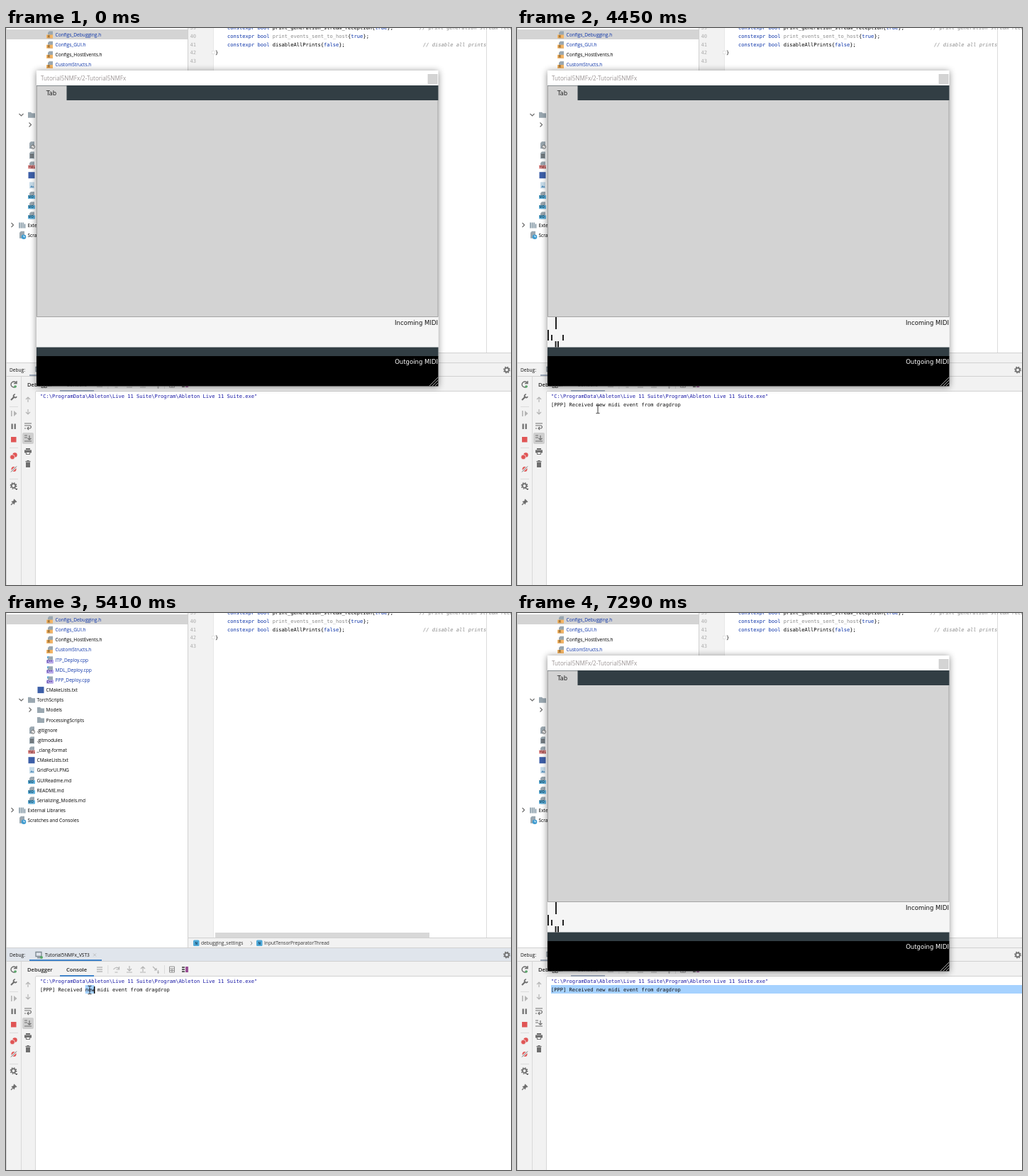
These frames come from a looping animation (712 px wide and 786 px high, 8000 ms). An HTML page:

```html
<!DOCTYPE html>
<html lang="en">
<head>
<meta charset="utf-8">
<style>
html, body { margin: 0; width: 100%; height: 100%; overflow: hidden; background: #fff; }
svg { display: block; width: 712px; height: 786px; --head: #f2f2f2; --line: #9ca7b8; }
svg.focus { --head: #e0e5ec; --line: #4083c9; }
text { white-space: pre; font-family: "Open Sans", "Noto Sans", sans-serif; font-size: 6.6px; font-weight: 500; }
.code { font-family: "DejaVu Sans Mono", "Noto Sans Mono", monospace; font-size: 7.07px; }
.gui { font-family: "DejaVu Sans", sans-serif; font-size: 8.53px; font-weight: 400; }
.title { font-size: 8.1px; font-weight: 400; }
.tab { font-size: 7.6px; font-weight: 600; }
.tag { font-size: 4.4px; font-weight: 700; }
.shadow { filter: drop-shadow(0 1px 5px #0007); }
</style>
</head>
<body>
<svg id="stage" viewBox="0 0 712 786"></svg>
<script>
const stage = document.getElementById('stage');
const GREY = '#6e6e6e', PALE = '#b4b4b4', RED = '#e05555', BLUE = '#0a32a8', PANEL = '#f2f2f2', EDGE = '#d1d1d1';

const rect = (x, y, w, h, fill, more = '') =>
  `<rect x="${x}" y="${y}" width="${w}" height="${h}" fill="${fill}" ${more}/>`;
const text = (x, y, str, fill = '#111', cls = '', more = '') =>
  `<text x="${x}" y="${y}" fill="${fill}" class="${cls}" ${more}>${str}</text>`;
const path = (x, y, d, color = GREY, width = 1.2, fill = 'none') =>
  `<path transform="translate(${x} ${y})" d="${d}" stroke="${color}" stroke-width="${width}" fill="${fill}"/>`;
const dot = (x, y, r, fill, more = '') => `<circle cx="${x}" cy="${y}" r="${r}" fill="${fill}" ${more}/>`;
const group = (id, body) => `<g id="${id}">${body}</g>`;
const span = (str, fill) => `<tspan fill="${fill}">${str}</tspan>`;
const gear = (x, y) => dot(x, y, 2.8, 'none', `stroke="${GREY}" stroke-width="1.7"`) +
  dot(x, y, 4.2, 'none', `stroke="${GREY}" stroke-width="1.4" stroke-dasharray="1.7 1.6"`);

// Icons of the project tree; x is the left edge, y the row centre
const page = (x, y) => path(x, y, 'M4-5h5v10h-7v-8z', 'none', 0, '#9aa7b0');
const tagged = (color, tag, ink) => (x, y) => page(x, y) +
  rect(x, y, 10, 5, color) + text(x + .5, y + 4.1, tag, ink, 'tag');
const icons = {
  h: (x, y) => page(x, y) + rect(x, y, 9, 5, '#f4b566') + text(x + 1.5, y + 4.2, 'H', '#6b4a1c', 'tag'),
  cpp: (x, y) => rect(x + 1, y - 5, 3, 3, '#5aa9dc') + tagged('#b7a7ea', 'C++', '#43318a')(x, y),
  build: (x, y) => rect(x + .5, y - 4.5, 9, 9, '#3d5fa8'),
  folder: (x, y) => path(x, y, 'M0-4h4l1.5 1.5h4.5v6.5h-10z', 'none', 0, '#9aa7b0'),
  ignore: (x, y) => page(x, y) + dot(x + 7, y + 2.5, 2.5, '#fff', `stroke="${GREY}"`) + path(x, y, 'M5.5 4l3-3', GREY, .8),
  list: (x, y) => page(x, y) + path(x, y, 'M3-1h5M3 1h5M3 3h5', '#444', .9),
  yml: tagged('#f0a0a0', 'YML', '#7c3030'),
  md: tagged('#62b5e0', 'MD', '#1d536f'),
  image: (x, y) => rect(x + 2, y - 4.5, 7, 9, '#c7dcea') + path(x, y, 'M3 3l2-3 1.5 2 1-1 1 2z', 'none', 0, '#5a93bd'),
  library: (x, y) => path(x, y, 'M1-4v8M3.5-4v8M6-4v8M8.5-2v6', '#6f8796', 1.4),
  scratch: (x, y) => page(x - 1, y - 1) + dot(x + 7, y + 2, 3.3, '#3e9bd0') + path(x, y, 'M7 0v2h1.7', '#fff', .9)
};

const rows = [
  [57, 'h', 'Configs_Debugging.h', 1], [57, 'h', 'Configs_GUI.h', 1], [57, 'h', 'Configs_HostEvents.h'],
  [57, 'h', 'CustomStructs.h', 1], [57, 'cpp', 'ITP_Deploy.cpp', 1], [57, 'cpp', 'MDL_Deploy.cpp', 1],
  [57, 'cpp', 'PPP_Deploy.cpp', 1], [44, 'build', 'CMakeLists.txt'], [31, 'folder', 'TorchScripts'],
  [44, 'folder', 'Models'], [44, 'folder', 'ProcessingScripts'], [31, 'ignore', '.gitignore'],
  [31, 'list', '.gitmodules'], [31, 'yml', '_clang-format'], [31, 'build', 'CMakeLists.txt'],
  [31, 'image', 'GridForUI.PNG'], [31, 'md', 'GUIReadme.md'], [31, 'md', 'README.md'],
  [31, 'md', 'Serializing_Models.md'], [18, 'library', 'External Libraries'], [18, 'scratch', 'Scratches and Consoles']
];
const rightChevron = 'M-1.5-3l3 3-3 3', downChevron = 'M-3-1.5l3 3 3-3';

function tree() {
  return rect(1, 2, 256, 14, '#d4d4d4') +
    rows.map(([x, icon, name, changed], i) => {
      const y = 9.5 + i * 14.16;
      return icons[icon](x, y) + text(x + 12.5, y + 2.5, name, changed ? BLUE : '#000');
    }).join('') +
    path(21.5, 122.5, downChevron) + path(34, 136.5, rightChevron) + path(9, 278, rightChevron);
}

function editor() {
  const baseline = n => 25.5 + (n - 41) * 11.9;
  const line = (n, body) => text(312, baseline(n), span('constexpr bool ', BLUE) + body, '#000', 'code');
  const note = (x, n, str) => text(x, baseline(n), str, '#8c8c8c', 'code', 'font-style="italic"');
  return rect(257, 0, 35, 458, PANEL) + rect(256, 0, 1, 473, EDGE) + rect(292, 0, .7, 458, '#dedede') +
    rect(677, 0, 1, 458, '#dcdcdc') +
    [39, 40, 41, 42, 43].map(n => text(259.5, baseline(n), n, '#adadad', 'code')).join('') +
    line(39, 'print_generation_stream_reception{' + span('true', BLUE) + '};') +
    line(40, span('print_events_sent_to_host', '#8c8c8c') + '{' + span('true', BLUE) + '};') +
    line(41, 'disableAllPrints{' + span('false', BLUE) + '};') +
    note(583, 39, '// print generation stream reception') + note(588, 41, '// disable all prints') +
    rect(290.5, 32.5, 4, 4, '#fff', 'stroke="#d8d8d8" stroke-width=".6"') +
    text(295, baseline(42), '}', '#000', 'code') +
    rect(295, 451, 302, 7, '#d8d8d8') +
    rect(257, 458, 455, 15, PANEL) + rect(257, 458, 455, 1, EDGE) +
    [[264, 'debugging_settings'], [353, 'InputTensorPreparatorThread']].map(([x, name]) =>
      rect(x, 461.5, 8.5, 8.5, '#4fa9d8', 'rx="1.5"') + text(x + 2.5, 467.5, 'N', '#173f5c', 'tag') +
      text(x + 11, 468.3, name, '#333')).join('') +
    path(346, 466, 'M-1-2.5l2 2.5-2 2.5', GREY, .8);
}

function debugPanel() {
  const arrow = 'M0-4v7M-3 0l3 3 3-3', up = 'M0 4v-7M-3 0l3-3 3 3';
  return rect(0, 473, 712, 18, 'var(--head)') + rect(0, 472, 712, 1, EDGE) +
    text(5, 485, 'Debug:') + path(42, 482.5, 'M0-4h8v6h-8zM2 4h5', '#7b8790', 1.3) + dot(50, 486, 2, '#59a869') +
    text(55, 485, 'Tutorial5NMFx_VST3') + path(125, 482.5, 'M-2-2l4 4M2-2l-4 4', PALE, .8) + gear(706, 482.5) +
    rect(0, 491, 712, 22, PANEL) + rect(0, 491, 712, 1, EDGE) + rect(0, 513, 42, 273, PANEL) +
    rect(42, 512, 670, 1, EDGE) + rect(21, 492, .8, 294, EDGE) + rect(41, 513, .8, 273, EDGE) +
    rect(33, 489, 102, 2, 'var(--line)') + rect(76, 511, 48, 2, 'var(--line)') +
    text(30, 506, 'Debugger', '#222', 'tab') + text(85, 506, 'Console', '#222', 'tab') +
    path(132, 503, 'M-4-3h8M-4 0h8M-4 3h8', '#999') +
    path(155.5, 503, 'M-4 0q4-5 8-1M4-4v4h-4M-2 4h4', PALE) +
    path(174, 502, arrow + 'M-4 5h8', PALE) + path(193, 502, up + 'M-4 5h8', PALE) +
    path(211, 503, 'M-4-4l5 5M1-2v3h-3M2 4h3M3.5 1v5', PALE) +
    path(234, 503, 'M-3.5-4h7v8h-7zM-3.5-1h7M-3.5 1.5h7M0-1v5', '#888', .9) +
    path(252, 503, 'M-4-3h4M-4 0h4M-4 3h4', '#333', 1.4) + rect(253, 499, 4, 8, '#9b4f96') +
    rect(143.5, 497, .7, 12, EDGE) + rect(223, 497, .7, 12, EDGE) +
    path(11, 503, 'M3.5-2a4 4 0 1 0 0 4M4-5v3.5h-4', GREY, 1.4) + dot(13, 506, 1.8, '#59a869') +
    path(11, 521, 'M-4 4l5-5', GREY, 2.2) + path(11, 521, 'M2-4a2.3 2.3 0 1 0 2 3', GREY, 1.7) +
    [534, 592, 636].map(y => rect(5, y, 12, .7, EDGE)).join('') +
    rect(7, 540, 1.6, 8, PALE) + path(11, 544, 'M0-4l4.5 4-4.5 4z', PALE, 0, PALE) +
    rect(7.5, 558.5, 2.2, 7.5, GREY) + rect(11.6, 558.5, 2.2, 7.5, GREY) + rect(7, 577, 7.5, 7.5, RED) +
    dot(12.5, 602.5, 3.2, RED) + dot(9, 605.5, 3.4, RED, `stroke="${PANEL}" stroke-width=".8"`) +
    dot(11, 622.5, 3.5, RED) + path(11, 622.5, 'M-5 5l10-10', PANEL, 2.6) + path(11, 622.5, 'M-4 4l8-8', GREY, 1) +
    gear(10.5, 646) + path(15, 651, 'M-2-1h3.5l-1.7 2z', 'none', 0, '#333') +
    path(11, 669, 'M-4 4l3-3M0-4l4 4M-3-1l4 4M1-3l-3 3 2 2 3-3z', GREY, 1.2, GREY) +
    path(31, 524, up, PALE) + path(31, 542, arrow, PALE) +
    path(31, 561, 'M-5-3h10M-5 0h8q3 2 0 4h-3M1 2l-2 2 2 2M-5 4h2') +
    group('follow', rect(23, 571, 16, 16, '#cfcfcf', 'rx="2"')) +
    path(31, 579, 'M-5-4h4M-5-1h4M-5 4h10M2-4v6M-.5 0l2.5 2 2.5-2') +
    rect(28, 593, 6, 2, GREY) + rect(26, 595.5, 10, 4, GREY) + rect(28.5, 598.5, 5, 3, '#fff', `stroke="${GREY}"`) +
    rect(27.5, 611, 7, 1.4, GREY) + rect(29.5, 610, 3, 1.2, GREY) + rect(28, 613, 6, 7, GREY);
}

function consoleText() {
  return group('line', rect(48, 525, 664, 12, '#a6d2ff')) + group('word', rect(111.8, 525, 12.8, 12, '#a6d2ff')) +
    text(48, 522.3, String.raw`"C:\ProgramData\Ableton\Live 11 Suite\Program\Ableton Live 11 Suite.exe"`, '#1a1aa6', 'code') +
    group('log', text(48, 534.3, '[PPP] Received new midi event from dragdrop', '#111', 'code')) +
    group('caret', rect(-.7, -5, 1.5, 10, '#000'));
}

function pluginWindow() {
  const notes = [[54, 408, 17], [43, 426, 15], [48, 433, 8], [64, 433, 8], [53.6, 442, 8.5], [57, 442, 8.5]];
  const slate = '#323e44';
  return rect(43, 60, 566.5, 445.5, '#fff', 'class="shadow"') +
    text(49, 73.7, 'Tutorial5NMFx/2-Tutorial5NMFx', '#9b9494', 'title') +
    rect(595, 65.5, 13, 13, '#d4d4d4', 'stroke="#c2c2c2" stroke-width=".6"') +
    rect(43, 81, 566.5, 21.5, slate) + rect(43, 102, 566.5, 306, '#d3d3d3') + rect(43, 81.5, 42.5, 22, '#d3d3d3') +
    path(43.5, 82, 'M0 0v325.5h565.5v-305', '#999', .8) + text(56.7, 95.4, 'Tab', '#222', 'gui') +
    rect(43, 408, 566.5, 42.5, '#f5f5f5') + rect(43, 450.5, 566.5, 13, slate) + rect(43, 463, 566.5, 42.5, '#000') +
    text(609, 418.6, 'Incoming MIDI', '#111', 'gui', 'text-anchor="end"') +
    text(609, 474, 'Outgoing MIDI', '#fff', 'gui', 'text-anchor="end"') +
    path(609, 505, 'M-12 0l12-12M-8 0l8-8M-4 0l4-4', '#aaa', 1) +
    group('notes', notes.map(([x, y, h]) => rect(x, y, 2, h, '#222')).join(''));
}

const pointer = path(0, 0, 'M0 0v11l2.6-2.5 1.8 4 1.6-.8-1.7-3.7h3.5z', '#000', .7, '#fff');
const cursors = {
  beam: path(0, 0, 'M-2.5-5.7h2l.5 .5 .5-.5h2M-2.5 5.7h2l.5-.5 .5 .5h2M0-5.5v11', '#222', .9),
  no: dot(0, 0, 5.6, '#fff', 'stroke="#000" stroke-width="1.7"') + path(0, 0, 'M-4-4l8 8', '#000', 1.7),
  copy: pointer + rect(4, 8, 6, 6, '#fff', 'stroke="#555" stroke-width=".6"') + path(7, 11, 'M-2 0h4M0-2v4', '#222', .9),
  arrow: pointer
};

stage.innerHTML = rect(0, 0, 712, 786, '#fff') + tree() + editor() + debugPanel() + rect(0, 0, .8, 786, '#c8c8c8') +
  consoleText() + group('win', pluginWindow()) +
  Object.entries(cursors).map(([kind, body]) => group(kind, body)).join('');

// start, end, kind, from x, y, to x, y
const moves = [
  [110, 180, 'beam', 702.5, 770.5],
  [1830, 1900, 'no', 260, 35],
  [1900, 2630, 'copy', 258, 75, 248, 426],
  [2630, 2770, 'copy', 248, 426],
  [3980, 4450, 'beam', 122, 556, 114, 538],
  [4450, 4870, 'beam', 114, 538],
  [4870, 5150, 'beam', 114, 538, 118, 520],
  [5150, 5410, 'beam', 118, 520, 118, 532],
  [5410, 5810, 'beam', 118, 532],
  [5810, 5880, 'beam', 122, 536],
  [5880, 6340, 'beam', 125, 540],
  [6540, 6820, 'arrow', 119, 532, 510, 485]
];
const carets = [[4520, 5270, 49, 543], [5270, 5410, 118, 532], [5410, 5540, 124.6, 532]];
const TICK = 70, LOOP = 8000;
const part = id => document.getElementById(id);
const show = (id, on) => part(id).setAttribute('opacity', +on);
const place = (id, x, y) => { show(id, 1); part(id).setAttribute('transform', `translate(${x} ${y})`); };
const within = (t, a, b) => t >= a && t < b;

function draw(t) {
  show('win', t < 4520 || t >= 7290 ? 1 : t >= 7220 ? .93 : 0);
  show('notes', t >= 2630);
  show('log', t >= 2700);
  show('word', within(t, 5410, 5540));
  show('line', t >= 5540);
  show('follow', t < 5540);
  stage.classList.toggle('focus', within(t, 4610, 7220));

  show('caret', 0);
  const caret = carets.find(([a, b]) => within(t, a, b));
  if (caret) place('caret', caret[2], caret[3]);

  Object.keys(cursors).forEach(kind => show(kind, 0));
  const move = moves.find(([a, b]) => within(t, a, b));
  if (move) {
    const [a, b, kind, x, y, toX = x, toY = y] = move;
    const k = Math.min(1, Math.floor((t - a) / TICK) * TICK / Math.max(TICK, b - a - TICK));
    place(kind, x + (toX - x) * k, y + (toY - y) * k);
  }
}

const begin = performance.now();
function loop() {
  draw((performance.now() - begin) % LOOP);
  requestAnimationFrame(loop);
}
loop();
</script>
</body>
</html>
```
